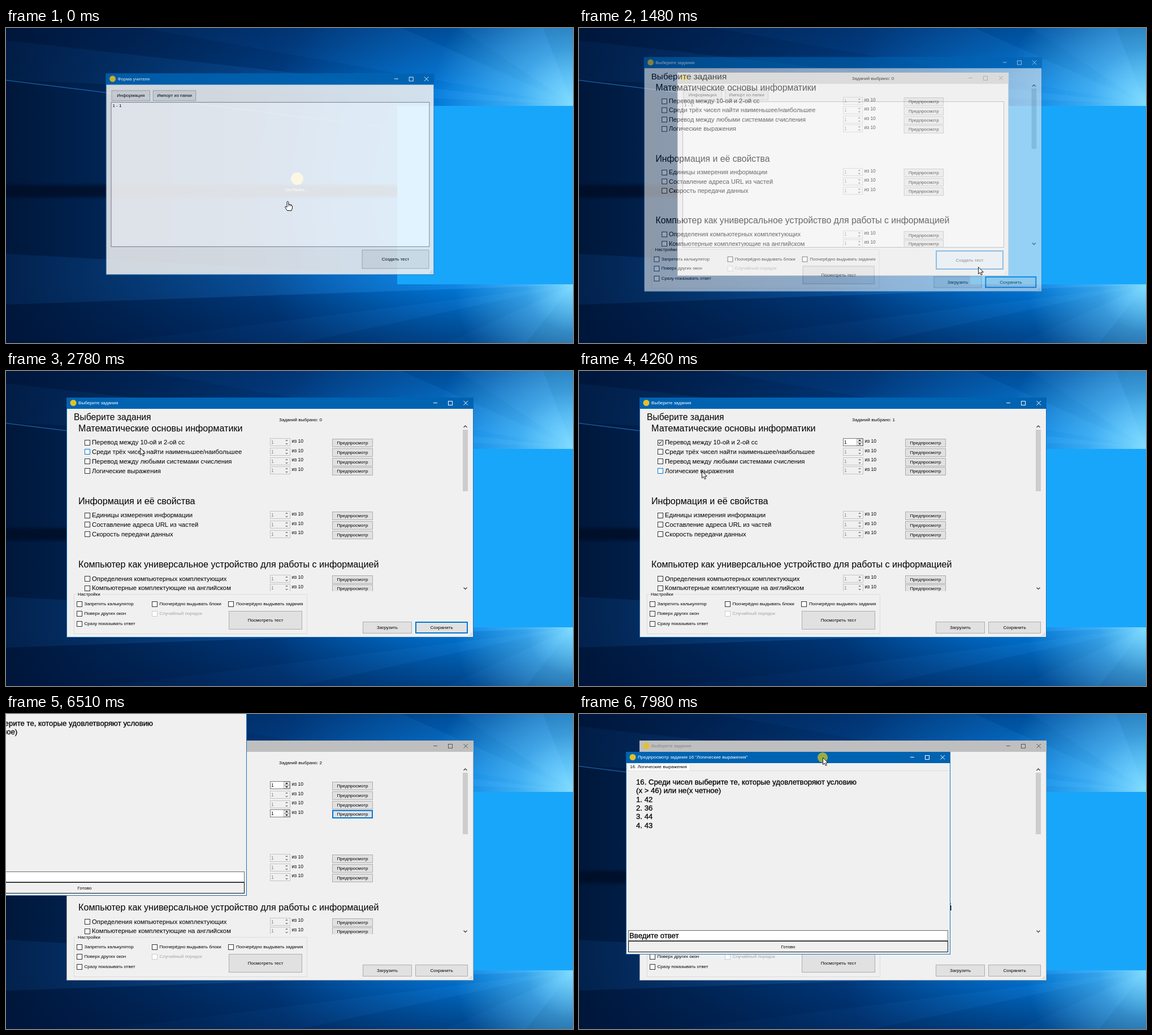
An HTML page with a canvas for the animation above (8 s loop, 1003 by 558 pixels).

```html
<!DOCTYPE html>
<html lang="ru">
<head>
<meta charset="utf-8">
<title>Выбор заданий</title>
<style>
html, body { margin: 0; width: 100%; height: 100%; overflow: hidden; background: #00265a; }
canvas { display: block; width: 1003px; height: 558px; }
</style>
</head>
<body>
<canvas id="stage" width="1003" height="558"></canvas>
<script>
const W = 1003, H = 558, LOOP = 8000, STEP = 77.5;
const BLUE = '#0063b1', FOCUS = '#0078d7', FACE = '#f0f0f0', ICON = '#e3c129';
const FONT = '"Liberation Sans", Arial, sans-serif';
const SMALL = 8.1;

const screen = document.getElementById('stage').getContext('2d');
let ctx = screen;

function makeLayer() {
  const c = document.createElement('canvas');
  c.width = W;
  c.height = H;
  return c.getContext('2d');
}

// ---------- basic drawing ----------
function fill(x, y, w, h, color) {
  ctx.fillStyle = color;
  ctx.fillRect(x, y, w, h);
}

function box(x, y, w, h, face, edge, line = 1) {
  fill(x, y, w, h, edge);
  fill(x + line, y + line, w - 2 * line, h - 2 * line, face);
}

function poly(points, color) {
  ctx.beginPath();
  points.forEach(([x, y]) => ctx.lineTo(x, y));
  ctx.closePath();
  ctx.fillStyle = color;
  ctx.fill();
}

function stroke(points, color, width = 1) {
  ctx.beginPath();
  points.forEach(([x, y], i) => i ? ctx.lineTo(x, y) : ctx.moveTo(x, y));
  ctx.strokeStyle = color;
  ctx.lineWidth = width;
  ctx.stroke();
}

function disc(x, y, r, color) {
  ctx.beginPath();
  ctx.arc(x, y, r, 0, Math.PI * 2);
  ctx.fillStyle = color;
  ctx.fill();
}

function text(str, x, y, size = SMALL, color = '#000', align = 'left') {
  ctx.font = `${size}px ${FONT}`;
  ctx.textAlign = align;
  ctx.textBaseline = 'middle';
  ctx.fillStyle = color;
  ctx.fillText(str, x, y);
}

// ---------- wallpaper ----------
function glow(x, y, r, rgb, alpha, mid = 0.4) {
  const g = ctx.createRadialGradient(x, y, 0, x, y, r);
  g.addColorStop(0, `rgba(${rgb},${alpha})`);
  g.addColorStop(0.4, `rgba(${rgb},${alpha * mid})`);
  g.addColorStop(1, `rgba(${rgb},0)`);
  fill(0, 0, W, H, g);
}

function beam(sx, sy, ax, ay, bx, by, alpha) {
  const g = ctx.createLinearGradient(sx, sy, (ax + bx) / 2, (ay + by) / 2);
  g.addColorStop(0, `rgba(50,170,255,${alpha})`);
  g.addColorStop(1, `rgba(20,110,210,${alpha * 0.3})`);
  poly([[sx, sy], [ax, ay], [bx, by]], g);
}

function vertical(y0, y1, rgb, alphas) {
  const g = ctx.createLinearGradient(0, y0, 0, y1);
  alphas.forEach((a, i) => g.addColorStop(i / (alphas.length - 1), `rgba(${rgb},${a})`));
  return g;
}

function paintWallpaper() {
  const layer = makeLayer();
  ctx = layer;
  const base = ctx.createLinearGradient(0, 0, W, 0);
  ['#00173a', '#002a5e', '#003f86', '#0056ac', '#006cca']
    .forEach((color, i) => base.addColorStop(i / 4, color));
  fill(0, 0, W, H, base);
  glow(930, 290, 500, '0,145,250', 0.95, 0.65);
  fill(0, 0, W, 110, vertical(0, 110, '0,20,60', [0.35, 0]));
  fill(0, 450, W, 108, vertical(450, H, '0,20,60', [0, 0.5]));

  beam(1003, 135, 800, 0, 950, 0, 0.5);
  beam(1003, 135, 240, 0, 700, 0, 0.22);
  beam(1003, 135, 0, 22, 0, 92, 0.25);
  beam(1003, 455, 0, 490, 0, 400, 0.4);
  beam(1003, 455, 180, 558, 520, 558, 0.16);
  beam(1003, 455, 780, 558, 920, 558, 0.3);
  stroke([[0, 92.5], [690, 178]], 'rgba(40,140,230,.55)', 1.5);
  fill(0, 274, 840, 30, vertical(274, 304, '0,10,32', [0, 0.65, 0.7, 0.65, 0]));
  glow(1003, 135, 250, '130,220,255', 1, 0.45);
  glow(1003, 455, 210, '130,220,255', 1, 0.4);

  fill(692, 138, 316, 316, '#18a6fb');

  disc(515, 267, 11, ICON);
  text('OurTasks...', 514, 287, SMALL, '#fff', 'center');
  ctx = screen;
  return layer.canvas;
}

// ---------- controls ----------
function button(label, x, y, w, h, state = '') {
  const styles = {
    hover: ['#e5f1fb', FOCUS, 1],
    pressed: ['#cce4f7', '#005499', 1],
    focus: ['#e1e1e1', FOCUS, 2],
    both: ['#e5f1fb', FOCUS, 2]
  };
  const [face, edge, line] = styles[state] || ['#e1e1e1', '#adadad', 1];
  box(x, y, w, h, face, edge, line);
  text(label, x + w / 2, y + h / 2 + 0.5, SMALL, '#000', 'center');
}

function checkBox(x, y, { checked, hover, pressed, disabled } = {}) {
  const edge = disabled ? '#ccc' : hover ? FOCUS : '#333';
  box(Math.round(x - 5), Math.round(y - 5), 10, 10, pressed ? '#cce4f7' : '#fff', edge);
  if (checked) stroke([[x - 2.8, y], [x - 0.8, y + 2.2], [x + 3, y - 2.5]], '#222', 1.1);
}

function spinner(y, enabled) {
  const ink = enabled ? '#000' : '#838383';
  box(467, y - 7, 36, 14, enabled ? '#fff' : FACE, enabled ? '#7a7a7a' : '#c4c4c4');
  text('1', 469, y + 0.5, 8.4, ink);
  if (enabled) {
    box(491, y - 6, 11, 6, FACE, '#b5b5b5');
    box(491, y, 11, 6, FACE, '#b5b5b5');
  }
  for (const dir of [-1, 1]) {
    poly([[494, y + dir * 2], [499, y + dir * 2], [496.5, y + dir * 4.5]], ink);
  }
}

function grip(x, y) {
  for (let i = 0; i < 3; i++)
    for (let j = 0; j <= i; j++) fill(x - 2 * j, y - 2 * (2 - i), 1, 1, '#a5a5a5');
}

function frame(title, x, y, w, h, active) {
  const ink = active ? '#fff' : '#858585', mark = active ? '#fff' : '#555';
  box(x, y, w, h, FACE, active ? '#1a73bd' : '#a9a9a9');
  fill(x, y, w, 20, active ? BLUE : '#bfbfbf');
  disc(x + 12, y + 9.5, 5.5, ICON);
  text(title, x + 21, y + 10, SMALL, ink);
  const r = x + w, cy = y + 9.5;
  stroke([[r - 71, cy], [r - 64, cy]], mark);
  ctx.strokeRect(r - 44.5, cy - 3, 7, 7);
  stroke([[r - 17.5, cy - 3.5], [r - 10, cy + 4]], mark);
  stroke([[r - 17.5, cy + 4], [r - 10, cy - 3.5]], mark);
}

// ---------- windows ----------
function inside(p, x, y, w, h) {
  return p.x >= x && p.x < x + w && p.y >= y && p.y < y + h;
}

function teacherWindow(n, cursor) {
  frame('Форма учителя', 174, 79, 586, 360, n < 18);
  button('Информация', 184, 109, 69, 19);
  button('Импорт из папки', 258, 109, 77, 19);
  box(183, 130, 569, 259, '#fff', '#82878f');
  text('1 - 1', 186, 136.5);
  const over = inside(cursor, 631, 394, 120, 34);
  const state = n === 12 ? 'pressed' : n > 12 ? (over ? 'both' : 'focus') : over ? 'hover' : '';
  button('Создать тест', 631, 394, 120, 34, state);
  grip(756, 435);
}

const SECTIONS = [
  ['Математические основы информатики', 103, 126.5, [
    'Перевод между 10-ой и 2-ой сс',
    'Среди трёх чисел найти наименьшее/наибольшее',
    'Перевод между любыми системами счисления',
    'Логические выражения']],
  ['Информация и её свойства', 232, 255.5, [
    'Единицы измерения информации',
    'Составление адреса URL из частей',
    'Скорость передачи данных']],
  ['Компьютер как универсальное устройство для работы с информацией', 344, 368, [
    'Определения компьютерных комплектующих',
    'Компьютерные комплектующие на английском']]
];

const OPTIONS = [
  ['Запретить калькулятор', 129.5, 412.5],
  ['Поверх других окон', 129.5, 429.5],
  ['Сразу показывать ответ', 129.5, 447.5],
  ['Поочерёдно выдывать блоки', 262.5, 412.5],
  ['Случайный порядок', 262.5, 429.5, true],
  ['Поочерёдно выдывать задания', 398, 412.5]
];

function taskRow(label, y, n, cursor, pressStep, previewStep) {
  const checked = n > pressStep, live = n >= 20 && n < 76;
  text(label, 152, y + 0.5, 11.3);
  const width = ctx.measureText(label).width + 14;
  const hover = live && inside(cursor, 138, y - 8, width, 16.8);
  checkBox(143.5, y, { checked, hover, pressed: n === pressStep });
  spinner(Math.round(y - 0.5), checked);
  text('из 10', 505.5, y - 2, 8.5);
  const top = Math.round(y - 6.5);
  const over = live && inside(cursor, 577, top, 72, 15);
  const focused = n >= previewStep;
  const state = n === previewStep ? 'pressed'
    : focused ? (over ? 'both' : 'focus') : over ? 'hover' : '';
  button('Предпросмотр', 577, top, 72, 15, state);
}

function taskWindow(n, cursor) {
  frame('Выберите задания', 107, 47, 720, 425, n < 76);
  text('Выберите задания', 120, 83, 15.7);
  text('Заданий выбрано: ' + ((n > 41) + (n > 58)), 483, 86.5);

  ctx.save();
  ctx.beginPath();
  ctx.rect(120, 92, 700, 298);
  ctx.clip();
  SECTIONS.forEach(([title, titleY, top, rows], s) => {
    text(title, 128, titleY, 16.15);
    rows.forEach((label, r) => {
      const press = s === 0 ? { 0: 41, 3: 58 }[r] : undefined;
      taskRow(label, top + r * 16.8, n, cursor, press, s === 0 && r === 3 ? 73 : Infinity);
    });
  });
  ctx.restore();

  fill(808, 104, 9, 109, '#cdcdcd');
  stroke([[809.5, 100], [812.5, 97], [815.5, 100]], '#444', 1.3);
  stroke([[809.5, 383.5], [812.5, 386.5], [815.5, 383.5]], '#444', 1.3);

  box(120, 395, 413, 71, FACE, '#dcdcdc');
  fill(125, 392, 45, 7, FACE);
  text('Настройки', 127, 395.5);
  for (const [label, x, y, disabled] of OPTIONS) {
    checkBox(x, y, { disabled });
    text(label, x + 9, y + 0.5, SMALL, disabled ? '#a3a3a3' : '#000');
  }
  button('Посмотреть тест', 394, 425, 130, 33);
  button('Загрузить', 631, 444, 87, 21);
  button('Сохранить', 724, 444, 93, 21, n < 41 ? 'focus' : '');
  grip(823, 468);
}

const QUESTION = [
  '16. Среди чисел выберите те, которые удовлетворяют условию',
  '(x > 46) или не(x четное)', '1. 42', '2. 36', '3. 44', '4. 43'
];

function heavyText(str, x, y) {
  text(str, x, y, 13.2);
  ctx.strokeStyle = '#000';
  ctx.lineWidth = 0.3;
  ctx.strokeText(str, x, y);
}

function previewWindow() {
  frame('Предпросмотр задания 16 "Логические выражения"', 83, 67, 574, 359, true);
  fill(86, 100, 569, 1, '#dcdcdc');
  box(86, 87, 111, 14, '#fff', '#e2e2e2');
  text('16. Логические выражения', 90, 94);
  QUESTION.forEach((line, i) => heavyText(line, 101, 121.5 + i * 15.3));
  box(87, 383, 566, 19, '#fff', '#6a6a6a');
  heavyText('Введите ответ', 89, 393);
  box(87, 402, 566, 20, FACE, '#111');
  text('Готово', 370, 412.5, SMALL, '#000', 'center');
}

// ---------- pointer ----------
function arrow(x, y) {
  const shape = [[0, 0], [0, 12.2], [2.8, 9.6], [4.8, 14], [6.8, 13.1], [4.9, 8.9], [8.8, 8.9]]
    .map(([dx, dy]) => [x + dx, y + dy]);
  poly(shape, '#fff');
  stroke([...shape, shape[0]], '#000', 0.9);
}

function hand(x, y) {
  const shape = [[-1.5, 0.5], [0, -0.3], [1.3, 0.7], [1.3, 5], [4, 5.2], [6.5, 6.2], [8, 7.5],
    [8, 11.5], [6.5, 16], [-1, 16], [-4.8, 10], [-4, 8.5], [-1.5, 10]]
    .map(([dx, dy]) => [x + dx, y + dy]);
  poly(shape, '#fff');
  stroke([...shape, shape[0]], '#111', 1);
  for (const dx of [1.3, 3.7, 6]) stroke([[x + dx, y + 5], [x + dx, y + 8.5]], '#111', 0.7);
}

// step, x, y
const PATH = [
  [0, 498, 307], [1, 498, 307], [8, 706, 423], [20, 706, 423], [28, 517, 283],
  [36, 237, 136], [39, 233, 124], [43, 233, 124], [54, 217, 176], [55, 217, 177],
  [60, 217, 177], [64, 420, 216], [68, 581, 201], [72, 594, 181], [77, 594, 181],
  [84, 200, -27], [97, 200, -27], [103, 431, 77]
];

// monotone cubic interpolation: smooth, with no overshoot around rests
function along(n, axis) {
  const last = PATH.length - 1;
  if (n >= PATH[last][0]) return PATH[last][axis];
  const slope = i => (PATH[i + 1][axis] - PATH[i][axis]) / (PATH[i + 1][0] - PATH[i][0]);
  const tangent = i => {
    if (i === 0 || i === last) return 0;
    const a = slope(i - 1), b = slope(i);
    return a * b > 0 ? 2 * a * b / (a + b) : 0;
  };
  const i = PATH.findIndex((p, k) => n < PATH[k + 1][0]);
  const span = PATH[i + 1][0] - PATH[i][0], u = (n - PATH[i][0]) / span, v = 1 - u;
  return PATH[i][axis] * (1 + 2 * u) * v * v + PATH[i + 1][axis] * (3 - 2 * u) * u * u
    + span * (tangent(i) * u * v * v - tangent(i + 1) * u * u * v);
}

// ---------- scene ----------
const OPENING = [[0.17, 0.945], [0.58, 0.978], [0.87, 0.991]];
const layer = makeLayer();
const wallpaper = paintWallpaper();

function opening(age, cx, cy, draw) {
  if (age < 0) return;
  if (age >= OPENING.length) return draw();
  const [alpha, scale] = OPENING[age];
  ctx = layer;
  ctx.clearRect(0, 0, W, H);
  ctx.save();
  ctx.translate(cx, cy);
  ctx.scale(scale, scale);
  ctx.translate(-cx, -cy);
  draw();
  ctx.restore();
  ctx = screen;
  ctx.globalAlpha = alpha;
  ctx.drawImage(layer.canvas, 0, 0);
  ctx.globalAlpha = 1;
}

function render(time) {
  const n = Math.floor((time % LOOP + 10) / STEP);
  const cursor = { x: Math.round(along(n, 1)), y: Math.round(along(n, 2)) };
  ctx.drawImage(wallpaper, 0, 0);
  opening(n + 2, 467, 259, () => teacherWindow(n, cursor));
  opening(n - 18, 467, 259.5, () => taskWindow(n, cursor));

  const dx = n < 97 ? -231 : cursor.x - 431, dy = n < 97 ? -104 : cursor.y - 77;
  opening(n - 76, 370 + dx, 246.5 + dy, () => {
    ctx.save();
    ctx.translate(dx, dy);
    previewWindow();
    ctx.restore();
  });

  if ([12, 41, 58, 73].includes(n) || n >= 98) {
    disc(cursor.x, cursor.y, 9, 'rgba(255,220,0,.6)');
  }
  (n < 2 ? hand : arrow)(cursor.x + 0.5, cursor.y + 0.5);
}

const start = performance.now();
function tick() {
  render(performance.now() - start);
  requestAnimationFrame(tick);
}
tick();
</script>
</body>
</html>
```
